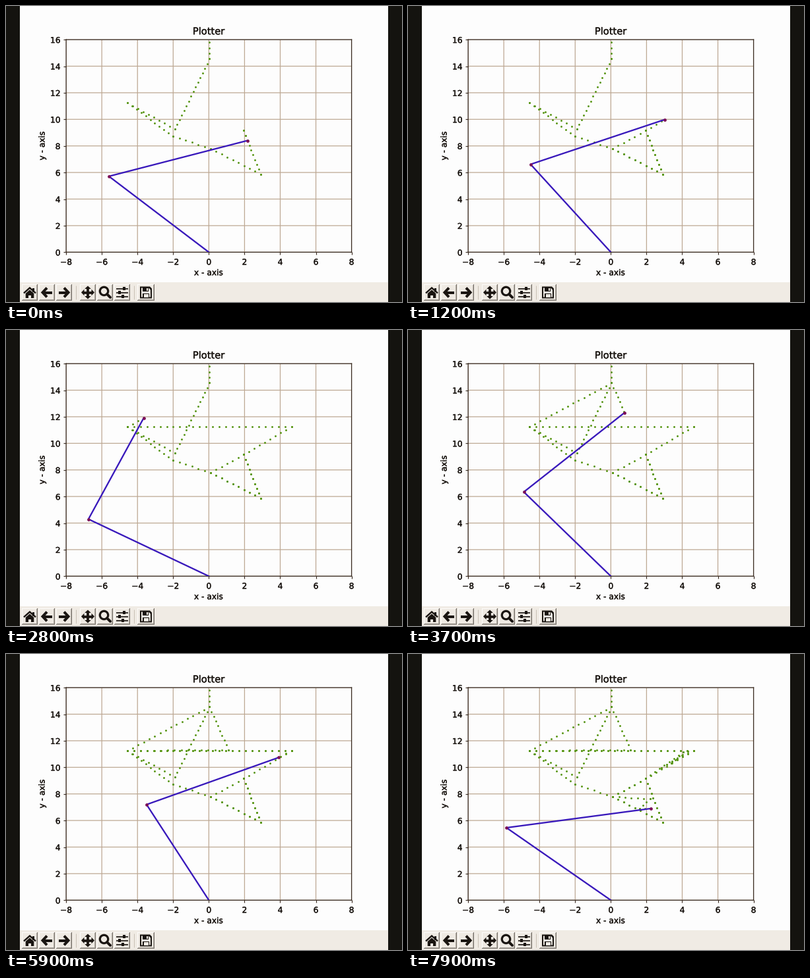
These frames come from a looping animation (600 px wide and 450 px high, 8 s). A matplotlib script:

```python
import numpy as np
import matplotlib.pyplot as plt
from matplotlib.animation import FuncAnimation
from matplotlib.patches import Circle, Polygon, Rectangle
from matplotlib.patheffects import withStroke

W, H, DPI = 600, 450, 100
PX = 72 / DPI            # points per pixel
ZOOM = 0.88              # scale of the recorded window
FRAMES, STEP = 80, 100
INK, EDGE, GRID, FACE = "#1a1511", "#3a2c22", "#bda893", "#efeae3"
BLUE, GREEN, JOINT = "#3818bb", "#559410", "#7d1056"
UPPER, FORE = 8.0, 8.22  # arm lengths
GAP = 0.37               # distance between trace dots

# Corners of the drawn star
TOP, LEFT, RIGHT, FOOT = (0.03, 14.55), (-4.57, 11.25), (4.63, 11.25), (2.9, 5.87)
NOTCH, WAIST, CROTCH = (1.1, 11.32), (1.95, 9.15), (0.1, 7.8)

# Runs of constant speed: end time in steps, corners passed
RUNS = [
    (-32, [(0, 16.2)]),
    (3.5, [TOP, (-1.9, 9.25), LEFT, (-2, 8.72), CROTCH, FOOT, WAIST, FOOT]),
    (14.5, [CROTCH, WAIST, RIGHT]),
    (57.8, [LEFT, TOP, NOTCH, LEFT, RIGHT]),
    (79, [(2.85, 9.98), (4.3, 11.2), (3.4, 10.3), (4.05, 11.15),
          WAIST, CROTCH, (2.2, 7.62), (1.6, 6.88), (2.24, 6.9)]),
]
times = [end for end, _ in RUNS]
corners = np.array([p for _, run in RUNS for p in run])
legs = np.hypot(*np.diff(corners, axis=0).T)
dist = np.append(0, legs.cumsum())
marks = dist[np.cumsum([len(run) for _, run in RUNS]) - 1]
dots = np.concatenate([np.linspace(a, b, max(2, round((b - a) / GAP) + 1))
                       for a, b in zip(dist, dist[1:])])


def at(d):
    return np.interp(d, dist, corners[:, 0]), np.interp(d, dist, corners[:, 1])


def elbow(x, y):
    r = np.hypot(x, y)
    a = (UPPER**2 - FORE**2 + r**2) / (2 * r)
    h = np.sqrt(max(UPPER**2 - a**2, 0))
    return (a * x - h * y) / r, (a * y + h * x) / r


plt.rcParams["font.family"] = "DejaVu Sans"
fig = plt.figure(figsize=(W / DPI, H / DPI), dpi=DPI, facecolor="#fdfdfd")

# Window frame and toolbar, in pixel coordinates
ui = fig.add_axes([0, 0, 1, 1])
ui.set(xlim=(0, W), ylim=(H, 0))
ui.axis("off")


def box(x0, y0, x1, y1, color=INK):
    ui.add_patch(Rectangle((x0, y0), x1 - x0, y1 - y0, fc=color, lw=0))


def stroke(points, width, color=INK, cap="butt"):
    ui.plot(*zip(*points), color=color, lw=width * PX,
            solid_capstyle=cap, solid_joinstyle="miter")


def shape(points, color=INK):
    ui.add_patch(Polygon(points, fc=color, lw=0))


def bolden(text):
    text.set_path_effects([withStroke(linewidth=0.35 * PX, foreground=INK)])


def label(x, y, text, size=10, **kw):
    bolden(ui.text(x, y, text, size=size * ZOOM, color=INK,
                   ha="center", va="center", **kw))


def button(x, y=423, w=24, h=25):
    box(x, y, x + w, y + h, "#77716a")
    box(x, y, x + w - 1, y + h - 1, "#fdfcfa")
    box(x + 1, y + 1, x + w - 1, y + h - 1, "#b3ada5")
    box(x + 1, y + 1, x + w - 2, y + h - 2, FACE)


def home(x, y):
    stroke([(x - 9, y + 1), (x, y - 7), (x + 9, y + 1)], 2.4)
    box(x + 4, y - 7, x + 7, y - 1)
    shape([(x - 6.3, y + 1.5), (x, y - 4), (x + 6.3, y + 1.5),
           (x + 6.3, y + 8.5), (x - 6.3, y + 8.5)])
    box(x - 1.7, y + 4, x + 1.7, y + 8.5, FACE)


def arrow(x, y, d):
    stroke([(x - 8 * d, y), (x + 6 * d, y)], 4)
    stroke([(x, y - 7), (x + 6.5 * d, y), (x, y + 7)], 4)


def pan(x, y):
    for dx, dy in ((1, 0), (-1, 0), (0, 1), (0, -1)):
        stroke([(x, y), (x + 7 * dx, y + 7 * dy)], 3.8)
        shape([(x + 10 * dx, y + 10 * dy),
               (x + 5.5 * dx - 4.8 * dy, y + 5.5 * dy + 4.8 * dx),
               (x + 5.5 * dx + 4.8 * dy, y + 5.5 * dy - 4.8 * dx)])


def lens(x, y):
    ui.add_patch(Circle((x - 1.5, y - 2), 6.2, fc="none", ec=INK, lw=3.2 * PX))
    stroke([(x + 3, y + 2.5), (x + 8, y + 7.5)], 4, cap="round")


def sliders(x, y):
    for dy, knob in ((-6, 3), (0, -4), (6, 1)):
        stroke([(x - 9, y + dy), (x + 9, y + dy)], 1.7)
        box(x + knob - 1.8, y + dy - 2.3, x + knob + 1.8, y + dy + 2.3)


def disk(x, y):
    for r, color in ((9, INK), (7, FACE)):
        shape([(x - r, y - r), (x + r - 3, y - r), (x + r, y - r + 3),
               (x + r, y + r), (x - r, y + r)], color)
    box(x - 5, y - 8, x + 4, y - 2)
    box(x + 0.5, y - 7, x + 2.5, y - 3, FACE)
    box(x - 5, y + 1, x + 5, y + 8)
    box(x - 3.5, y + 2.5, x + 3.5, y + 7, FACE)


box(0, 420, W, H, "#f0ebe4")
box(0, 0, 21, H, "#14130f")
box(579, 0, W, H, "#14130f")
for group in (24, 112):
    for i in range(3):
        button(group + 26 * i)
button(199, w=26)
for x in (106, 194):
    stroke([(x, 425), (x, 446)], 1, "#c9c1b6")
home(36, 435.5)
arrow(62, 435.5, -1)
arrow(88, 435.5, 1)
pan(124, 435.5)
lens(150, 435.5)
sliders(176, 435.5)
disk(212, 435.5)

label(307, 38.7, "Plotter", 12)
label(307, 405.8, "x - axis")
label(55, 212.5, "y - axis", rotation=90)

# Plot area
x0, x1, y0, y1 = 91.1, 523.6, 51.1, 374.3
ax = fig.add_axes([x0 / W, 1 - y1 / H, (x1 - x0) / W, (y1 - y0) / H])
ax.set(xlim=(-8, 8), ylim=(0, 16), xticks=range(-8, 9, 2), yticks=range(0, 17, 2))
ax.set_facecolor("#fdfdfd")
ax.set_axisbelow(True)
ax.grid(color=GRID, lw=1.25 * PX, snap=False)
ax.tick_params(labelsize=10 * ZOOM, length=3.5 * ZOOM, width=1.2 * PX,
               pad=3.5 * ZOOM, color=EDGE, labelcolor=INK)
ax.tick_params(axis="x", pad=3.9 * ZOOM)
for spine in ax.spines.values():
    spine.set(color=EDGE, linewidth=1.3 * PX, snap=False)
for text in ax.get_xticklabels() + ax.get_yticklabels():
    bolden(text)

trace, = ax.plot([], [], "o", color=GREEN, ms=2.9 * PX, mew=0, zorder=3)
arm, = ax.plot([], [], color=BLUE, lw=2.3 * PX, zorder=4)
joints, = ax.plot([], [], "o", color=JOINT, ms=4.8 * PX, mew=0, zorder=5)


def update(n):
    gone = np.interp(n, times, marks)
    tx, ty = at(gone)
    ex, ey = elbow(tx, ty)
    trace.set_data(*at(dots[dots <= gone]))
    arm.set_data([0, ex, tx], [0, ey, ty])
    joints.set_data([ex, tx], [ey, ty])
    return trace, arm, joints


anim = FuncAnimation(fig, update, frames=FRAMES, interval=STEP, repeat=True,
                     repeat_delay=0, blit=False)
plt.show()
```
